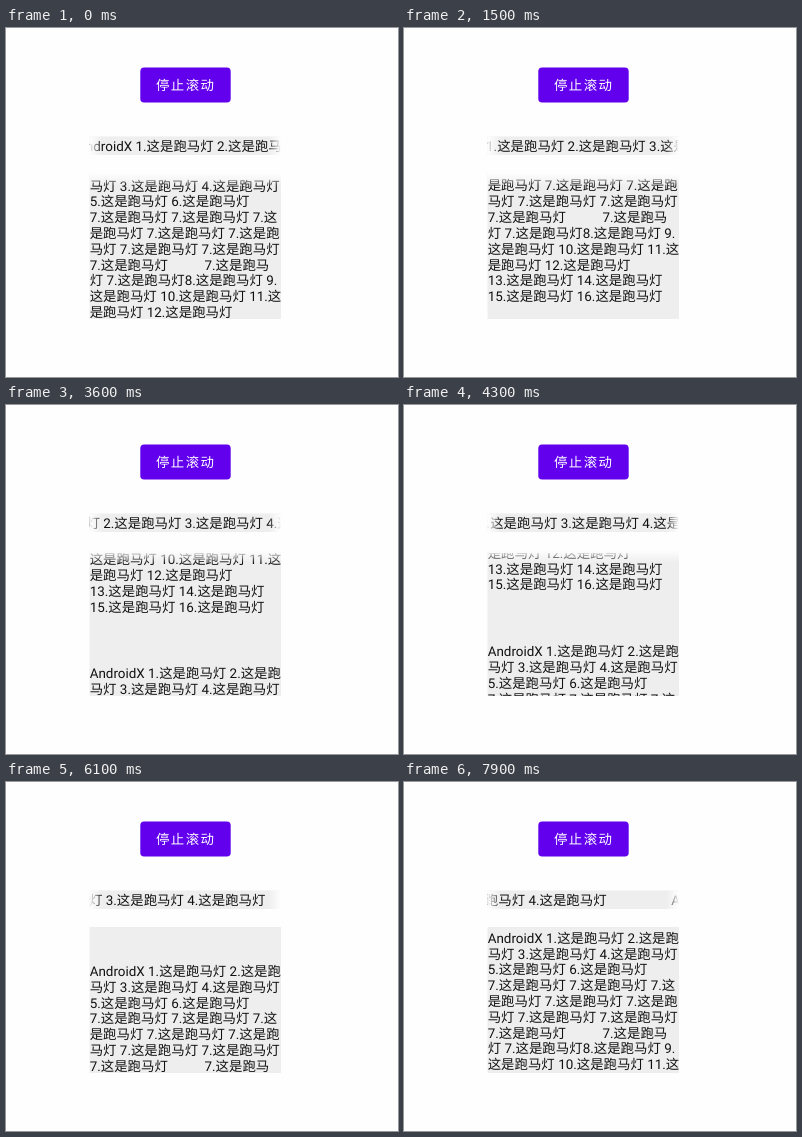
These frames come from a looping animation (392x349 px, 8 s). An HTML page:

```html
<!DOCTYPE html>
<html lang="zh-CN">
<head>
<meta charset="utf-8">
<title>跑马灯</title>
<style>
  html, body { margin: 0; width: 100%; height: 100%; overflow: hidden; background: #fefefe; }
  svg { display: block; width: 392px; height: 349px; }
  text {
    font: 13.43px Roboto, "Noto Sans CJK SC", "Noto Sans CJK", sans-serif;
    fill: #111; white-space: pre; text-rendering: geometricPrecision;
  }
  .label { font-weight: 500; letter-spacing: 1.4px; fill: #fff; }
</style>
</head>
<body>
<svg viewBox="0 0 392 349">
  <defs>
    <linearGradient id="fadeL">
      <stop offset="0" stop-color="#fefefe"/>
      <stop offset="1" stop-color="#fefefe" stop-opacity="0"/>
    </linearGradient>
    <linearGradient id="fadeR">
      <stop offset="0" stop-color="#fefefe" stop-opacity="0"/>
      <stop offset="1" stop-color="#fefefe"/>
    </linearGradient>
    <linearGradient id="fadeT" x2="0" y2="1">
      <stop offset="0" stop-color="#fefefe"/>
      <stop offset="1" stop-color="#fefefe" stop-opacity="0"/>
    </linearGradient>
    <clipPath id="rowClip"><rect x="83.5" y="108.5" width="191.5" height="18.5"/></clipPath>
    <clipPath id="boxClip"><rect x="83.5" y="148" width="191.5" height="143"/></clipPath>
  </defs>

  <rect x="134.3" y="39.6" width="90.4" height="34.9" rx="3.8" fill="#6200ee"/>
  <text class="label" x="150" y="61.9">停止滚动</text>

  <rect x="83.5" y="108.5" width="191.5" height="18.5" fill="#eee"/>
  <g clip-path="url(#rowClip)"><g id="row"></g></g>
  <rect x="83.5" y="108.5" width="12.7" height="18.5" fill="url(#fadeL)"/>
  <rect x="262.3" y="108.5" width="12.7" height="18.5" fill="url(#fadeR)"/>

  <rect x="83.5" y="145" width="191.5" height="146" fill="#eee"/>
  <g clip-path="url(#boxClip)"><g id="column"></g></g>
  <rect id="topFade" x="83.5" y="145" width="191.5" height="13" fill="url(#fadeT)"/>
</svg>
<script>
  const LOOP = 8000, STEP = 100;
  const LEFT = 83.7, LINE = 15.81;
  const ROW_CYCLE = 445.9, COLUMN_CYCLE = 240.6;

  const item = n => n + '.这是跑马灯';
  const items = (...ns) => ns.map(item).join(' ');

  const lines = [
    'AndroidX ' + item(1) + ' 2.这是跑',
    '马灯 ' + items(3, 4),
    items(5, 6),
    items(7, 7) + ' 7.这',
    '是跑马灯 ' + item(7) + ' 7.这是跑',
    '马灯 ' + items(7, 7),
    item(7) + ' '.repeat(11) + '7.这是跑马',
    '灯 ' + item(7) + item(8) + ' 9.',
    '这是跑马灯 ' + item(10) + ' 11.这',
    '是跑马灯 ' + item(12),
    items(13, 14),
    items(15, 16)
  ];
  const FADE_STOP = lines.length * LINE;

  const row = document.getElementById('row');
  const column = document.getElementById('column');
  const topFade = document.getElementById('topFade');

  function addText(parent, x, y, content) {
    const el = document.createElementNS('http://www.w3.org/2000/svg', 'text');
    el.setAttribute('x', x);
    el.setAttribute('y', y);
    el.textContent = content;
    parent.appendChild(el);
  }

  // Each marquee carries a second copy one cycle further on.
  for (const copy of [0, 1]) {
    addText(row, LEFT + copy * ROW_CYCLE, 122.6, 'AndroidX ' + items(1, 2, 3, 4));
    lines.forEach((line, i) =>
      addText(column, LEFT, 160.7 + i * LINE + copy * COLUMN_CYCLE, line));
  }

  function draw(now) {
    const t = Math.floor((now % LOOP) / STEP) * STEP / 1000;
    const across = 12.6 + 31.6 * t;
    // The column rests at its start position once a cycle is complete.
    const up = Math.min(13.9 + 31.7 * t, COLUMN_CYCLE);
    row.setAttribute('transform', `translate(${-across} 0)`);
    column.setAttribute('transform', `translate(0 ${-up})`);
    topFade.setAttribute('visibility', up <= FADE_STOP ? 'visible' : 'hidden');
  }

  const start = performance.now();
  function tick() {
    draw(performance.now() - start);
    requestAnimationFrame(tick);
  }
  tick();
</script>
</body>
</html>
```
